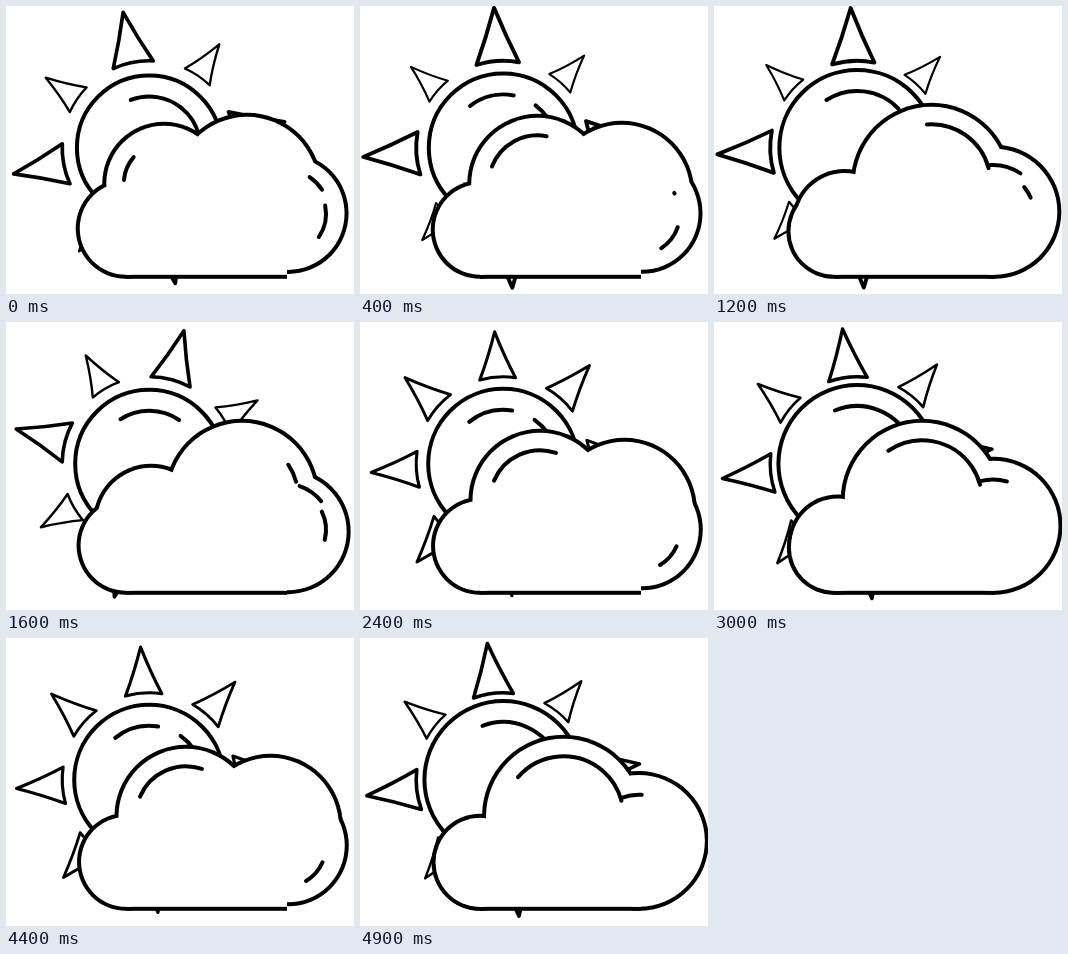
Write an HTML page with a canvas that moves like this. It is 348x288 px and loops after 5 s.

```html
<!DOCTYPE html>
<html lang="en">
<head>
<meta charset="utf-8">
<title>Sun and cloud</title>
<style>
  html, body { margin: 0; width: 100%; height: 100%; overflow: hidden; background: #fff; }
  canvas { display: block; }
</style>
</head>
<body>
<canvas id="stage" width="348" height="288"></canvas>
<script>
const ctx = document.getElementById('stage').getContext('2d');
const LOOP = 5000, STEP = 100;
const SUN = { x: 143.2, y: 141 };
const FLOOR = 270;
const TAU = 2 * Math.PI, RAD = Math.PI / 180;

// Path of one puff across the cloud: [age in cycles, x, top].
const PATH = [
  [0, 120, 180], [0.35, 145, 143], [0.49, 158, 117], [0.75, 180, 108], [1, 203.5, 98],
  [1.35, 236, 98], [1.49, 241, 108], [1.75, 264.5, 117], [2, 279, 136], [2.35, 282, 148]
];

const clamp = (v, lo, hi) => Math.min(hi, Math.max(lo, v));

function along(path, age) {
  let i = 0;
  while (i < path.length - 2 && age > path[i + 1][0]) i++;
  const [a, ax, ay] = path[i], [b, bx, by] = path[i + 1];
  const k = clamp((age - a) / (b - a), 0, 1);
  return [ax + (bx - ax) * k, ay + (by - ay) * k];
}

// Degrees run clockwise from straight up.
function polar(deg, r) {
  return [SUN.x + r * Math.sin(deg * RAD), SUN.y - r * Math.cos(deg * RAD)];
}

function arc(x, y, r, from, to) {
  if (to - from < 1) return;
  ctx.lineWidth = 4;
  ctx.beginPath();
  ctx.arc(x, y, r, (from - 90) * RAD, (to - 90) * RAD);
  ctx.stroke();
}

function disc(x, y, r) {
  ctx.beginPath();
  ctx.arc(x, y, r, 0, TAU);
  ctx.fill();
}

function drawRay(deg, size) {
  const half = 11.7 + size * 0.28, base = 87, mid = 107 + size / 2;
  const tip = polar(deg, 131.5 + size);
  ctx.lineWidth = 3 + size * 0.1;
  ctx.beginPath();
  ctx.moveTo(...tip);
  ctx.quadraticCurveTo(...polar(deg + half * 0.36, mid), ...polar(deg + half, base));
  ctx.arc(SUN.x, SUN.y, base, (deg + half - 90) * RAD, (deg - half - 90) * RAD, true);
  ctx.quadraticCurveTo(...polar(deg - half * 0.36, mid), ...tip);
  ctx.closePath();
  ctx.fill();
  ctx.stroke();
}

function drawSun(sec, u, breath) {
  // Slow turn with a sway; neighbouring rays trade sizes.
  const turn = -19.8 + 22.5 * sec + 10 * Math.sin(Math.PI * (sec - 1.65));
  const size = 2.5 + 7 * Math.cos(TAU * sec / 5 - 55 * RAD);
  for (let i = 0; i < 8; i++) drawRay(turn + i * 45, i % 2 ? -size : size);

  const r = 75.5 + 3.3 * breath;
  disc(SUN.x, SUN.y, r);
  arc(SUN.x, SUN.y, r, 0, 360);

  const wave = Math.cos(2 * TAU * u);
  const gap = 69 - 62 * u, open = 13 * clamp(-4 * wave, 0, 1);
  arc(SUN.x, SUN.y, r - 21, -30 + 9 * wave, gap - open);
  arc(SUN.x, SUN.y, r - 21, gap + open, 75);
}

function puff(age, breath) {
  const [x, top] = along(PATH, age);
  const size = age < 1 ? 45 + 33 * age : 68.5 + 9.5 * Math.cos(Math.PI * (age - 1) / 1.75);
  const r = size + 1.5 * breath;
  return { x, y: Math.min(top + r, FLOOR - r), r, age };
}

function drawCloud(u, breath) {
  const puffs = [0, 1, 2].map(k => puff(u + k, breath));
  const lobe = 46.7 - 1.6 * breath;
  // Black union first, then the same union inset in white.
  for (const [color, grow] of [['#000', 2], ['#fff', -2]]) {
    ctx.fillStyle = color;
    disc(120, FLOOR - lobe, lobe + grow);
    for (const p of puffs) disc(p.x, p.y, p.r + grow);
    ctx.fillRect(120, 200, 161, FLOOR + grow - 200);
  }

  for (const { x, y, r, age } of puffs) {
    const head = Math.min(75, -49 + 260 * (age - 0.49));
    const tail = Math.max(-85, -85 + 70 * (age - 0.49) + 230 * Math.max(0, age - 1));
    arc(x, y, r - 19.5, tail, head);
  }

  // Highlights sliding down the right side.
  const w = (u + 0.1) % 1 - 0.1;
  arc(279, 207, 51 - 14 * w, -20 + 110 * w, 62 - 59 * Math.exp(-5 * w));
  arc(279, 207, 41, 45 + 112 * u ** 1.7, 157 - 125 * (1 - u) ** 2);
}

function draw(t) {
  // The opening starts slightly behind the steady two-second cycle and catches up.
  const lag = 120 * Math.max(0, 1 - t / 800);
  const u = (t + 1100 - lag) / 2000 % 1;
  const breath = Math.cos(TAU * (u - 0.025));
  ctx.setTransform(1, 0, 0, 1, 0, 0);
  ctx.fillStyle = '#fff';
  ctx.fillRect(0, 0, 348, 288);
  ctx.translate(0, 0.8);
  ctx.strokeStyle = '#000';
  ctx.lineCap = ctx.lineJoin = 'round';
  drawSun(t / 1000, u, breath);
  drawCloud(u, breath);
}

const start = performance.now();
function tick() {
  const t = (performance.now() - start) % LOOP;
  draw(Math.floor(t / STEP) * STEP);
  requestAnimationFrame(tick);
}
tick();
</script>
</body>
</html>
```
